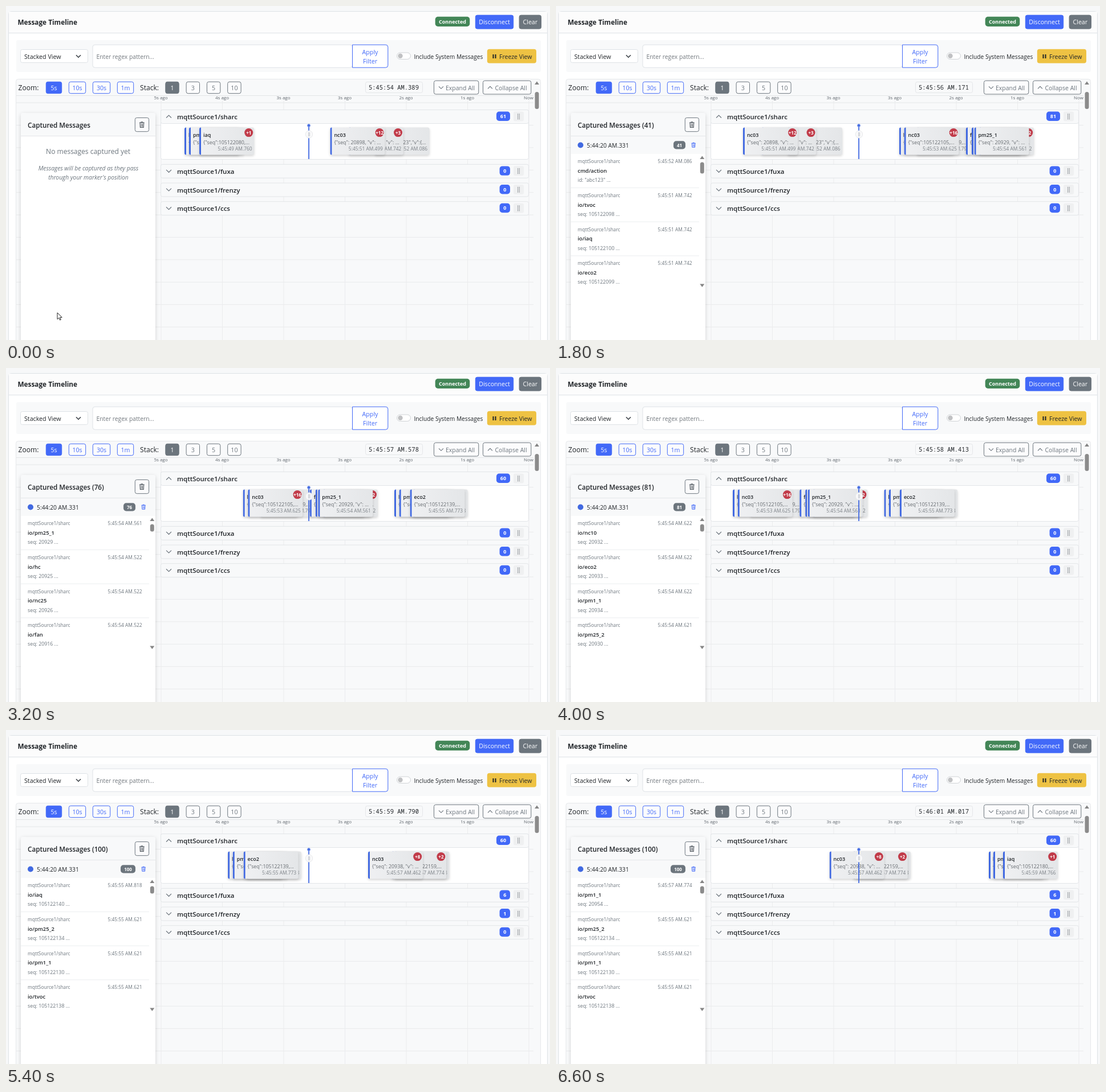
Recreate the animation shown at these times as an HTML page with a canvas. Size 954 by 587 pixels, loop 6.8 s.

```html
<!DOCTYPE html>
<html lang="en">
<head>
<meta charset="utf-8">
<title>Message Timeline</title>
<style>
html, body { margin: 0; width: 100%; height: 100%; overflow: hidden; background: #f7f8f9; }
canvas { display: block; width: 954px; height: 587px; }
</style>
</head>
<body>
<canvas id="stage" width="954" height="587"></canvas>
<script>
const ctx = document.getElementById('stage').getContext('2d');
const LOOP = 6800;
const SANS = '"Open Sans", "Noto Sans", sans-serif';
const MONO = '"Noto Sans Mono", "DejaVu Sans Mono", monospace';
const BLUE = '#4269f8', BAR = '#4169e1', GRAY = '#6c757d', INK = '#212529', LINE = '#dee2e6', SOFT = '#f8f9fa';

// [time in ms, scrolled px, clock seconds after 5:45:00]
const track = [
  [0, 0, 54.389], [800, 106.3, 55.165], [1800, 240.5, 56.171], [3200, 426.7, 57.578],
  [4000, 532.3, 58.413], [5400, 718.6, 59.790], [6600, 874, 61.017]
];

// [start x, title, sequence or body, seconds, hidden count, appears at], back to front
const cards = [
  [313, 'hc', '105122076', '49.612', 0, 0],
  [321, 'pm1_1', '20884', '49.655', 0, 0],
  [339, 'iaq', '105122080', '49.760', 1, 0],
  [646.5, 'action', '{"id":"abc123","v":{...', '52.086', 0, 0],
  [600.8, 'tvoc', '20916', '51.742', 3, 0],
  [568.4, 'nc03', '20898', '51.499', 12, 0],
  [873, 'iaq', '105122109', '53.793', 0, 400],
  [842.3, 'hc', '105122104', '53.622', 0, 400],
  [851, 'nc03', '105122105', '53.625', 16, 400],
  [959.5, 'fan', '20916', '54.522', 0, 1400],
  [969.5, 'hc', '20925', '54.522', 0, 1400],
  [982.5, 'nc10', '20932', '54.622', 2, 1400],
  [974, 'pm25_1', '20929', '54.561', 0, 1400],
  [1107.7, 'hc', '105122128', '55.621', 0, 2400],
  [1116.3, 'pm1_1', '105122130', '55.621', 0, 2400],
  [1140.4, 'iaq', '105122140', '55.818', 0, 2400],
  [1135.2, 'eco2', '105122139', '55.773', 0, 2400],
  [1400, 'pm25_1', '105122161', '57.818', 0, 4400],
  [1394.8, 'pm1_1', '105122159', '57.774', 2, 4400],
  [1353.6, 'nc03', '20938', '57.462', 8, 4400],
  [1633, 'hc', '105122176', '59.612', 0, 6400],
  [1641, 'pm1_1', '20960', '59.655', 0, 6400],
  [1658, 'iaq', '105122180', '59.766', 1, 6400]
];

// [from ms, count, "title seconds value" newest first]
const recent = ['io/pm25_2 55.621 105122134', 'io/pm1_1 55.621 105122130', 'io/tvoc 55.621 105122138'];
const air = ['io/tvoc 51.742 105122098', 'io/iaq 51.742 105122100', 'io/eco2 51.742 105122099'];
const captures = [
  [0, 0, []],
  [200, 13, ['io/nc03 51.499 20898', 'io/fan 51.499 20897', 'io/hc 51.499 20896', 'io/nc25 51.499 20895']],
  [400, 40, [...air, 'io/pm25_2 51.742 105122094']],
  [800, 41, ['cmd/action 52.086 "abc123"', ...air]],
  [2200, 43, ['io/hc 53.622 105122104', 'cmd/action 52.086 "abc123"', ...air.slice(0, 2)]],
  [2400, 59, ['io/nc03 53.625 105122105', 'io/pm1_1 53.625 105122106', 'io/tvoc 53.625 105122107', 'io/eco2 53.625 105122108']],
  [2600, 60, ['io/iaq 53.793 105122109', 'io/nc03 53.625 105122105', 'io/pm1_1 53.625 105122106', 'io/tvoc 53.625 105122107']],
  [3200, 76, ['io/pm25_1 54.561 20929', 'io/hc 54.522 20925', 'io/nc25 54.522 20926', 'io/fan 54.522 20916']],
  [3400, 81, ['io/nc10 54.622 20932', 'io/eco2 54.622 20933', 'io/pm1_1 54.622 20934', 'io/pm25_2 54.621 20930']],
  [4200, 85, ['io/hc 55.621 105122128', 'io/nc10 54.622 20932', 'io/eco2 54.622 20933', 'io/pm1_1 54.622 20934']],
  [4400, 99, ['io/eco2 55.773 105122139', ...recent]],
  [4600, 100, ['io/iaq 55.818 105122140', ...recent]],
  [6200, 100, ['io/nc03 57.462 20938', ...recent]],
  [6400, 100, ['io/pm1_1 57.774 20954', ...recent]]
];

const topics = [
  ['sharc', 182, [[0, 61], [1400, 81], [2600, 60]]],
  ['fuxa', 277.8, [[0, 0], [4400, 5], [5200, 6]]],
  ['frenzy', 310.5, [[0, 0], [4400, 1]]],
  ['ccs', 343.2, [[0, 0]]]
];

const latest = (table, t) => table.filter(row => row[0] <= t).pop();

function sample(t, col) {
  let i = 0;
  while (i < track.length - 2 && t > track[i + 1][0]) i++;
  const a = track[i], b = track[i + 1];
  return a[col] + (b[col] - a[col]) * (t - a[0]) / (b[0] - a[0]);
}

function box(x, y, w, h, fill, stroke, r = 3) {
  ctx.beginPath();
  ctx.roundRect(x, y, w, h, r);
  if (fill) { ctx.fillStyle = fill; ctx.fill(); }
  if (stroke) { ctx.strokeStyle = stroke; ctx.lineWidth = 1; ctx.stroke(); }
}

function text(str, x, y, size, color = INK, align = 'left', style = '400', family = SANS) {
  ctx.font = `${style} ${size}px ${family}`;
  ctx.fillStyle = color;
  ctx.textAlign = align;
  ctx.fillText(str, x, y);
}

function path(points, color, width = 1.1) {
  ctx.beginPath();
  points.forEach(([x, y]) => ctx.lineTo(x, y));
  ctx.strokeStyle = color;
  ctx.lineWidth = width;
  ctx.stroke();
}

function disc(x, y, r, fill, stroke) {
  ctx.beginPath();
  ctx.arc(x, y, r, 0, 7);
  ctx.fillStyle = fill;
  ctx.fill();
  if (stroke) { ctx.strokeStyle = stroke; ctx.lineWidth = 1; ctx.stroke(); }
}

function rect(x, y, w, h, color) {
  ctx.fillStyle = color;
  ctx.fillRect(x, y, w, h);
}

const chevron = (x, y, half, dy, color, width) => path([[x - half, y - dy], [x, y + dy], [x + half, y - dy]], color, width);

function button(label, x, y, w, h, color, filled) {
  box(x + .3, y + .3, w - .6, h - .6, filled ? color : '#fcfcfd', color, 3.2);
  text(label, x + w / 2, y + h / 2 + 4, 10.6, filled ? '#fff' : color, 'center');
}

function triangle(x, y, dir) {
  ctx.beginPath();
  ctx.moveTo(x - 4, y + 2.5 * dir);
  ctx.lineTo(x + 4, y + 2.5 * dir);
  ctx.lineTo(x, y - 3 * dir);
  ctx.fillStyle = '#858585';
  ctx.fill();
}

function trash(x, y, s, color) {
  ctx.save();
  ctx.translate(x, y);
  ctx.scale(s, s);
  rect(-4.5, -4.5, 9, 1.4, color);
  rect(-1.8, -5.6, 3.6, 1.2, color);
  path([[-3.5, -3], [-3, 5], [3, 5], [3.5, -3]], color, 1.2);
  for (const dx of [-1.4, 0, 1.4]) rect(dx - .3, -2, .7, 5.6, color);
  ctx.restore();
}

function drawHeader() {
  rect(0, 0, 954, 587, '#f7f8f9');
  box(4.5, 9.5, 945, 600, '#fff', LINE, 4);
  rect(5, 10, 944, 37, '#fcfcfc');
  rect(5, 47, 944, 1, LINE);
  text('Message Timeline', 20.5, 33, 11.8, INK, 'left', '700');
  box(752.7, 18.8, 60.6, 17.2, '#438657', null, 4.8);
  text('Connected', 783, 31, 9, '#fff', 'center', '700');
  button('Disconnect', 823, 15.8, 67, 24.6, BLUE, true);
  button('Clear', 899.8, 15.8, 39, 24.6, GRAY, true);

  box(18, 60, 920, 56, SOFT);
  box(25.5, 76.5, 118, 23, '#fff', LINE);
  text('Stacked View', 32, 92.5, 10.7);
  chevron(127, 88.3, 4, 2, '#343a40', 1.5);
  box(152, 68.2, 455.5, 40, '#fff', LINE, 4);
  text('Enter regex pattern...', 158.5, 92.5, 10.3, '#73797f');
  box(607.5, 68.2, 62.3, 40, '#fff', BLUE, [0, 4, 4, 0]);
  text('Apply', 638.5, 84.5, 10.7, BLUE, 'center');
  text('Filter', 638.5, 101, 10.7, BLUE, 'center');
  box(685.5, 82, 24, 11.5, '#fff', '#cfd2d5', 6);
  disc(691.5, 87.7, 4.2, '#c0c1c3');
  text('Include System Messages', 715.5, 92.5, 10.2);
  box(843.8, 75.8, 86.2, 24.6, '#eec243', null, 4);
  rect(853.5, 85, 2, 7, INK);
  rect(857.5, 85, 2, 7, INK);
  text('Freeze View', 865, 92.5, 10.5);
}

function drawTimelineFrame(t) {
  box(17.5, 128.5, 920, 480, SOFT, '#e6e8ea', 4);
  for (let i = 0; i < 10; i++) rect(18, 209 + i * 39.4, 907, 1, '#e9eaec');
  for (let i = 0; i < 7; i++) rect(271.5 + i * 107.5, 165, 1, 422, '#ebecee');
  rect(18, 157, 907, 1, '#e3e5e7');
  rect(18, 169.5, 907, 1, '#e6e8ea');
  ['5s ago', '4s ago', '3s ago', '3s ago', '2s ago', '1s ago', 'Now'].forEach((label, i) =>
    text(label, 271.5 + i * 107.5, 164, 8, '#5d646b', 'center'));

  text('Zoom:', 21.5, 148, 12.1);
  button('5s', 70, 133, 28, 21, BLUE, true);
  button('10s', 110, 133, 30, 21, BLUE);
  button('30s', 152, 133, 31, 21, BLUE);
  button('1m', 195, 133, 29, 21, BLUE);
  text('Stack:', 235, 148, 12.1);
  ['1', '3', '5', '10'].forEach((label, i) => button(label, 279.5 + i * 36.3, 133, 24, 21, GRAY, i === 0));

  box(630.5, 133.5, 100, 19, SOFT, '#e4e6e8');
  const now = sample(t, 2);
  const clock = `5:${45 + Math.floor(now / 60)}:${(now % 60).toFixed(3).padStart(6, '0').replace('.', ' AM.')}`;
  text(clock, 636, 147, 10.48, INK, 'left', '400', MONO);
  box(750.5, 131.3, 78.3, 23.7, '#fcfcfd', GRAY, 3.2);
  chevron(763, 143.3, 4, 2, GRAY);
  text('Expand All', 771, 147.5, 10.5, GRAY);
  box(836.5, 131.3, 84.3, 23.7, '#fcfcfd', GRAY, 3.2);
  chevron(849, 143.3, 4, -2, GRAY);
  text('Collapse All', 857.5, 147.5, 10.5, GRAY);

  triangle(931, 135.5, 1);
  box(927.5, 151, 7, 30, '#8b8b8b', null, 3.5);
}

function drawTopic([name, y, counts], t) {
  const open = name === 'sharc';
  if (open) box(271.5, y + .5, 645, 87, '#fff', '#e2e5e8');
  box(271.5, y + .5, 645, 24, SOFT, '#e2e5e8');
  chevron(285.5, y + 12.3, 4.5, open ? -2.2 : 2.2, GRAY, 1.2);
  text('mqttSource1/' + name, 300, y + 17, 11.5, INK, 'left', '600');
  const count = String(latest(counts, t)[1]);
  const w = count.length > 1 ? 24 : 18.4, left = 884 - w;
  box(left, y + 3.6, w, 16.4, BLUE, null, 4.8);
  text(count, left + w / 2, y + 15.1, 9, '#fff', 'center', '700');
  box(890, y + 3.5, 18, 17, '#eff0f1');
  for (let i = 0; i < 10; i++) rect(897 + i % 2 * 2.7, y + 7.5 + (i >> 1) * 2.1, 1.2, 1.2, '#73797f');
}

function drawCard([start, title, body, seconds, hidden], x) {
  const fill = ctx.createLinearGradient(x, 0, x + 96, 0);
  fill.addColorStop(0, '#eff0f2');
  fill.addColorStop(1, '#e4e6e8');
  ctx.save();
  ctx.shadowColor = 'rgba(0,0,0,.17)';
  ctx.shadowBlur = 4;
  ctx.shadowOffsetY = 2;
  box(x, 213.5, 96, 48, fill);
  ctx.restore();
  ctx.save();
  ctx.beginPath();
  ctx.roundRect(x, 213.5, 96, 48, 3);
  ctx.clip();
  rect(x, 213, 3, 50, BAR);
  ctx.restore();
  if (/^\d+$/.test(body)) body = body.length > 5 ? `{"seq":${body},...` : `{"seq": ${body}, "v": ...`;
  text(title, x + 7, 229.5, 9, INK, 'left', '600');
  text(body, x + 7, 243, 8.75, '#666b70');
  text(`5:45:${seconds.replace('.', ' AM.')}`, x + 92.5, 253.8, 8.4, '#7b8086', 'right');
  if (hidden) {
    disc(x + 86.7, 222.6, 7.5, '#c13b49');
    text('+' + hidden, x + 86.7, 225.6, 8, '#fff', 'center', '700');
  }
}

function drawLane(t) {
  const scroll = sample(t, 1);
  ctx.save();
  ctx.beginPath();
  ctx.rect(272, 206, 644.5, 63);
  ctx.clip();
  for (const card of cards) {
    const x = card[0] - scroll;
    if (t >= card[5] && x > 288) drawCard(card, x);
  }
  ctx.restore();
  rect(530.2, 212, 1.8, 57, BAR);
  disc(531, 210, 2.5, BAR, '#8ea7ee');
  box(525.5, 219, 12, 13, 'rgba(250,250,251,.95)', '#e6e8ea', 6);
  rect(530, 222, .8, 7, '#b4b8bc');
  rect(532, 222, .8, 7, '#b4b8bc');
}

function drawMessage(entry, y) {
  const [title, seconds, value] = entry.split(' ');
  text('mqttSource1/sharc', 38, y + 16.2, 8.4, GRAY);
  text(`5:45:${seconds.replace('.', ' AM.')}`, 238.5, y + 16.2, 8.4, GRAY, 'right');
  text(title, 38, y + 32.8, 9.4, INK, 'left', '600');
  text(`${value[0] === '"' ? 'id' : 'seq'}: ${value} ...`, 38, y + 49, 8.8, GRAY);
}

function drawPanel(t) {
  const [, count, rows] = latest(captures, t);
  ctx.save();
  ctx.shadowColor = 'rgba(0,0,0,.16)';
  ctx.shadowBlur = 7;
  ctx.shadowOffsetY = 2;
  box(26, 188, 236, 430, '#fff', null, 4);
  ctx.restore();
  box(26, 188, 236, 40, SOFT, null, [4, 4, 0, 0]);
  rect(26, 228, 236, 1, '#e4e6e9');
  text('Captured Messages' + (count ? ` (${count})` : ''), 38, 213.5, 11.7, INK, 'left', '600');
  box(226.3, 196.4, 24.3, 24.3, '#fbfbfc', GRAY, 3.2);
  trash(238.3, 208.6, .95, '#50575e');

  if (!count) {
    text('No messages captured yet', 144, 260, 12, GRAY, 'center');
    text('Messages will be captured as they pass', 144.5, 288.5, 10.3, GRAY, 'center', 'italic 400');
    text("through your marker's position", 144.5, 304.5, 10.3, GRAY, 'center', 'italic 400');
    return;
  }
  rect(26, 229, 236, 31, SOFT);
  disc(43, 244.5, 5, BAR);
  text('5:44:20 AM.331', 54, 248.5, 10.3);
  const w = count > 99 ? 26 : 21;
  box(227 - w, 237.3, w, 14.2, GRAY, null, 4.8);
  text(String(count), 227 - w / 2, 247.6, 8, '#fff', 'center', '700');
  trash(241.2, 244.3, .8, BLUE);
  rows.forEach((entry, i) => {
    drawMessage(entry, 260 + i * 59.75);
    if (i < 3) rect(26, 319 + i * 59.75, 225, 1, '#eceef0');
  });
  triangle(256.3, 266.5, 1);
  triangle(256.3, 491, -1);
  box(252.8, 274.5, 7, count > 60 ? 13 : 20, '#8b8b8b', null, 3.5);
}

function drawPointer() {
  ctx.beginPath();
  for (const [x, y] of [[0, 0], [0, 11.5], [2.7, 9], [4.5, 13], [6.3, 12.2], [4.6, 8.3], [8.2, 8.3]]) ctx.lineTo(90 + x, 539 + y);
  ctx.closePath();
  ctx.fillStyle = '#fff';
  ctx.strokeStyle = '#222';
  ctx.lineWidth = 1;
  ctx.fill();
  ctx.stroke();
}

function draw(t) {
  drawHeader();
  drawTimelineFrame(t);
  topics.forEach(topic => drawTopic(topic, t));
  drawLane(t);
  drawPanel(t);
  if (t < 200) drawPointer();
}

// The picture advances in 200 ms steps, with one slightly longer hold.
function quantize(t) {
  return t >= 6000 && t < 6220 ? 6000 : Math.min(6600, Math.floor(t / 200) * 200);
}

function tick() {
  draw(quantize(performance.now() % LOOP));
  requestAnimationFrame(tick);
}
tick();
</script>
</body>
</html>
```
